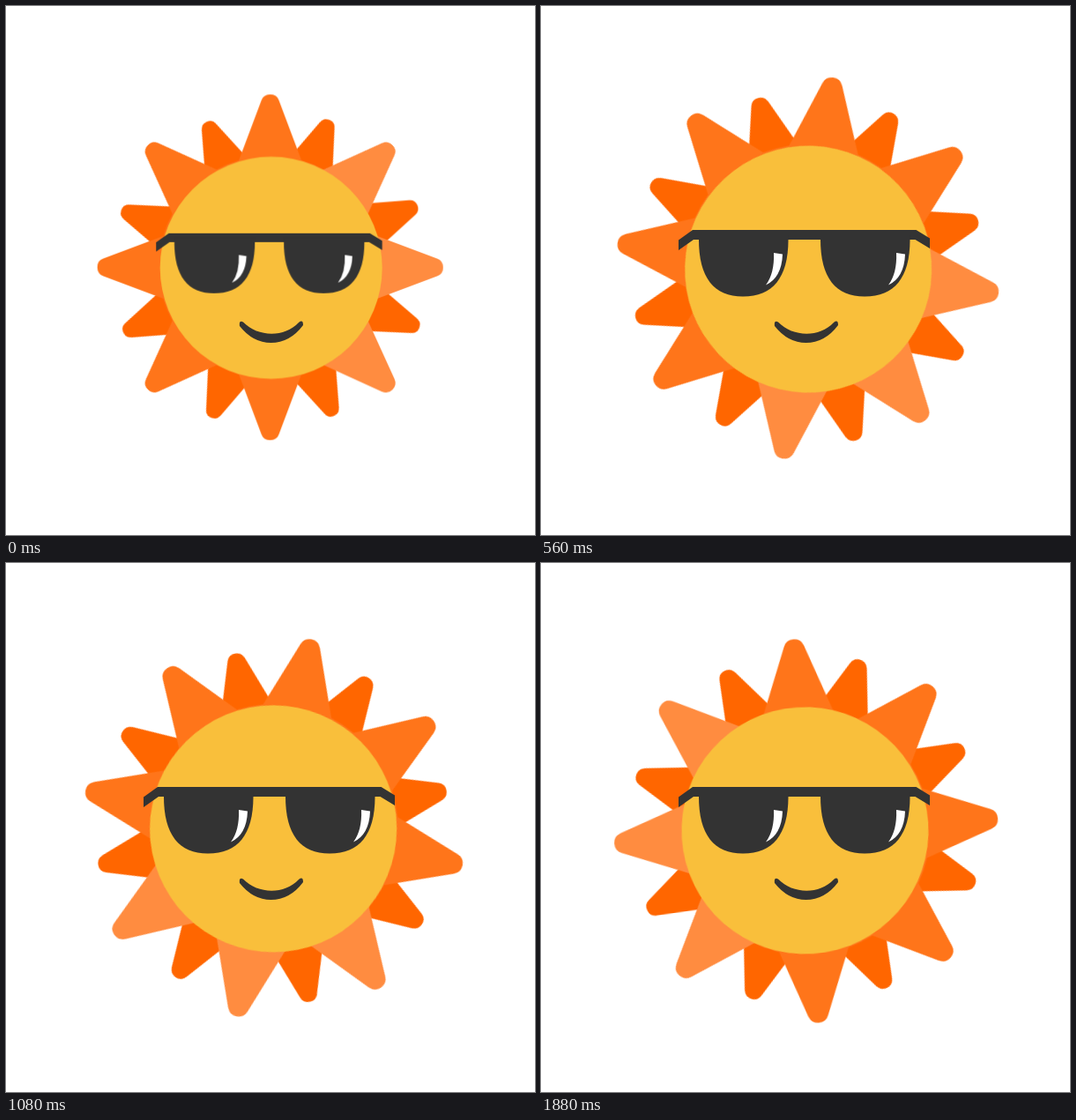
Animation, 600 px wide and 600 px high, one loop 1.92 s. Source, as an HTML page without scripts:

```html
<!DOCTYPE html>
<html lang="en">
<head>
<meta charset="utf-8">
<title>Cool sun</title>
<style>
  html, body { margin: 0; width: 100%; height: 100%; overflow: hidden; background: #fff; }
  svg { display: block; width: 100vw; height: 100vh; }

  .spin { animation: spin 1920ms steps(48) infinite; }
  .pop { --from: .9; --peak: 1.1; animation: pop 1920ms infinite; }
  .shades { transform-origin: 298.5px 292px; }
  .glare { --from: .865; --peak: 1.13; transform-origin: 264.5px 298px; }

  @keyframes spin { to { transform: rotate(180deg); } }
  @keyframes pop {
    0% { transform: scale(var(--from)); animation-timing-function: steps(5); }
    10.4167% { transform: scale(var(--peak)); animation-timing-function: steps(5); }
    20.8333%, 100% { transform: scale(1); }
  }
</style>
</head>
<body>
<svg viewBox="0 0 600 600">
  <defs>
    <path id="long" d="M120-45L210.2-11.24A12 12 0 0 1 210.2 11.24L120 45Z"/>
    <path id="short" d="M120-35.7L194.9-9.93A10.5 10.5 0 0 1 194.9 9.93L120 35.7Z"/>
    <g id="shortPair">
      <use href="#short"/>
      <use href="#short" transform="rotate(180)"/>
    </g>
    <path id="lens" d="M179 260V265C179 308 196 329.5 229 329.5C263 329.5 280.5 308 280.5 265V260Z"/>
    <path id="shine" d="M264 280L274 281.5Q273 308 255 316.5Q265 303 264 280Z"/>
  </defs>

  <g transform="translate(300 300)">
    <g class="pop">
      <g class="spin">
        <g fill="#f60" transform="translate(-.2 -2.1) rotate(21.6)">
          <use href="#shortPair"/>
          <use href="#shortPair" transform="rotate(45)"/>
          <use href="#shortPair" transform="rotate(90)"/>
          <use href="#shortPair" transform="rotate(135)"/>
        </g>
        <g fill="#ff751a" transform="translate(-.4 -4)">
          <circle r="140.5"/>
          <use href="#long" transform="rotate(90)"/>
          <use href="#long" transform="rotate(135)"/>
          <use href="#long" transform="rotate(180)"/>
          <use href="#long" transform="rotate(225)"/>
          <use href="#long" transform="rotate(270)"/>
          <g fill="#ff8c40">
            <use href="#long" transform="rotate(-45)"/>
            <use href="#long"/>
            <use href="#long" transform="rotate(45)"/>
          </g>
        </g>
        <circle cx=".75" cy="-3.4" r="140" fill="#f9bf3b"/>
      </g>
    </g>
  </g>

  <g class="pop shades" fill="#333">
    <path d="M172 254H425.5L441 263.5V275L424.5 265H173L156 277V265.5Z"/>
    <use href="#lens"/>
    <use href="#lens" x="138"/>
  </g>
  <g class="pop glare" fill="#fff">
    <use href="#shine"/>
    <use href="#shine" x="139"/>
  </g>

  <path fill="#333" d="M265 363Q264 356 269 358.500C286 376 316 376 332 359Q337 355 337 362Q322 382 300.500 382Q280 382 265 363Z"/>
</svg>
</body>
</html>
```
